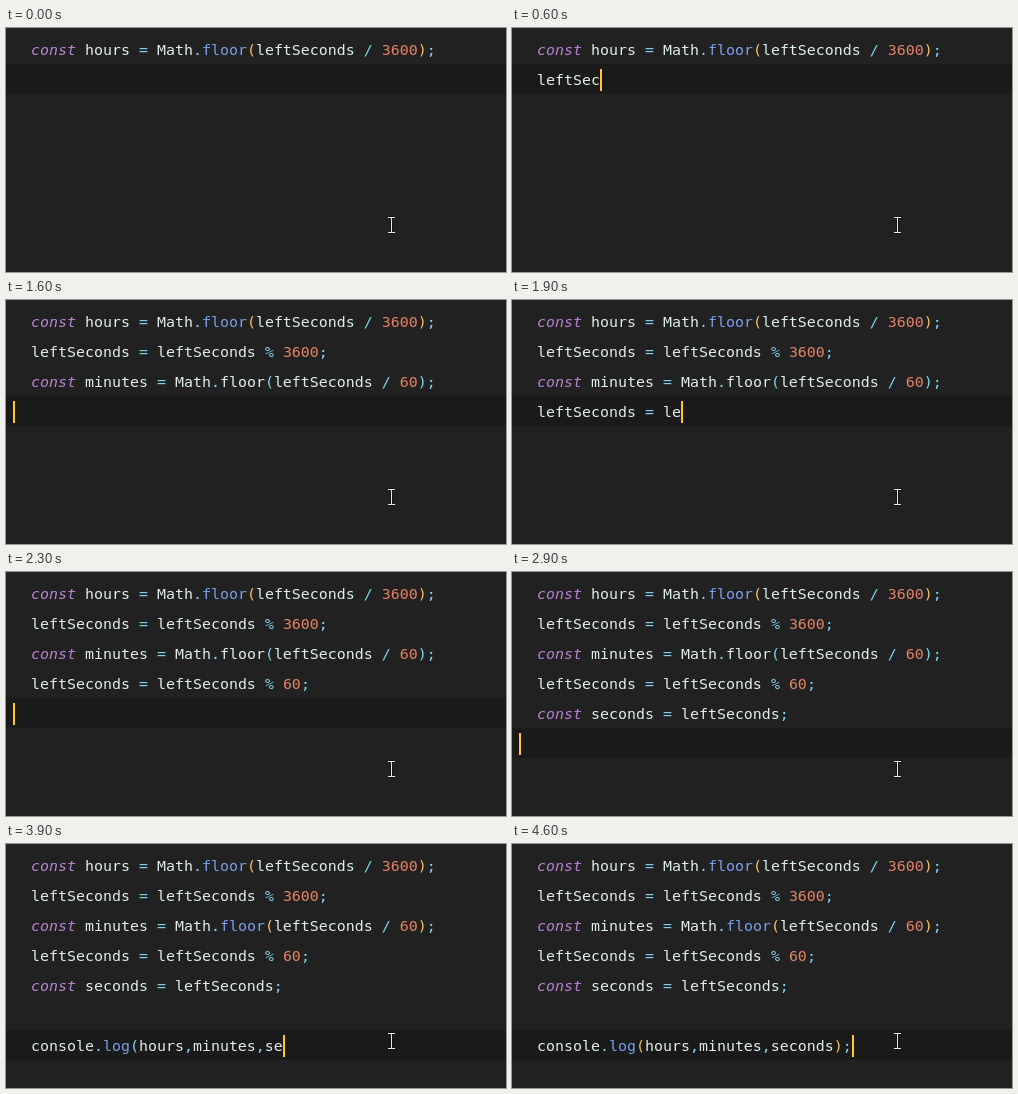
These frames come from a looping animation (500x244 px, 4.7 s). An HTML page:

```html
<!DOCTYPE html>
<html lang="en">
<head>
<meta charset="utf-8">
<title>Typing code</title>
<style>
  html, body { margin: 0; width: 100%; height: 100%; overflow: hidden; background: #212121; }
  #band { position: absolute; left: 0; width: 100%; height: 30px; background: #1a1a1a; }
  #code {
    position: absolute; left: 25px; top: 7px; margin: 0; color: #e0eeee;
    font: 14.95px/30px "DejaVu Sans Mono", "Noto Sans Mono", monospace;
    font-variant-ligatures: none;
  }
  #code div { height: 30px; }
  #caret { position: absolute; width: 2px; height: 22px; background: #ffc828; }
  #mouse { position: absolute; left: 380px; top: 187px; }
  .key { color: #b983d3; font-style: italic; }
  .num { color: #e38266; }
  .fn { color: #7b9ff0; }
  .op { color: #84d2f2; }
  .par { color: #f5c265; }
</style>
</head>
<body>
<div id="band"></div>
<pre id="code"></pre>
<div id="caret"></div>
<svg id="mouse" width="11" height="21" fill="none">
  <path d="M2 2.5H9M5.5 2.5V17.5M2 17.5H9" stroke="#111" stroke-width="2.4"/>
  <path d="M2 2.5H9M5.5 2.5V17.5M2 17.5H9" stroke="#e8e8e8"/>
</svg>
<script>
const LOOP = 4700, STEP = 100, LEFT = 25, ROW = 30, CHAR = 9;

// from/to: first and last typing step; enter: caret leaves the row;
// fn/par: when calls and brackets get their final colour
const lines = [
  { text: 'const hours = Math.floor(leftSeconds / 3600);', from: -200, to: -100, enter: 0 },
  { text: 'leftSeconds = leftSeconds % 3600;', from: 600, to: 1000, enter: 1100 },
  { text: 'const minutes = Math.floor(leftSeconds / 60);', from: 1400, to: 1500, enter: 1600, fn: 3500, par: 3500 },
  { text: 'leftSeconds = leftSeconds % 60;', from: 1700, to: 2200, enter: 2300 },
  { text: 'const seconds = leftSeconds;', from: 2400, to: 2800, enter: 2900 },
  { text: '', from: 2900, to: 2900, enter: 3200 },
  { text: 'console.log(hours,minutes,seconds);', from: 3600, to: 4000, enter: Infinity, par: 4100 }
];

const [band, code, caret] = ['band', 'code', 'caret'].map(id => document.getElementById(id));

function typedCount({ text, from, to }, t) {
  const part = (t - from + STEP) / (to - from + STEP);
  return Math.round(text.length * Math.min(1, Math.max(0, part)));
}

function kind(token, { fn = 0, par = 0 }, t) {
  if (token === 'const') return 'key';
  if (/^\d/.test(token)) return 'num';
  if (/^(floor|log)$/.test(token)) return t >= fn ? 'fn' : '';
  if (/^[()]$/.test(token)) return t >= par ? 'par' : 'op';
  return /^\w/.test(token) ? '' : 'op';
}

function paintLine(line, t) {
  const shown = line.text.slice(0, typedCount(line, t));
  return '<div>' + shown.replace(/\w+|[^\w\s]/g,
    token => `<span class="${kind(token, line, t)}">${token}</span>`) + '</div>';
}

function render(t) {
  const row = lines.findIndex(line => t < line.enter);
  const col = typedCount(lines[row], t) || -2; // an empty row has no indent yet
  const top = 7 + ROW * row;
  band.style.top = top - 1 + 'px';
  caret.style.top = top + 4 + 'px';
  caret.style.left = LEFT + CHAR * col + 'px';
  caret.hidden = t < 100;
  code.innerHTML = lines.map(line => paintLine(line, t)).join('');
}

const start = performance.now();
let last = -1;
function tick() {
  const t = Math.floor((performance.now() - start) % LOOP / STEP) * STEP;
  if (t !== last) render(last = t);
  requestAnimationFrame(tick);
}
tick();
</script>
</body>
</html>
```
